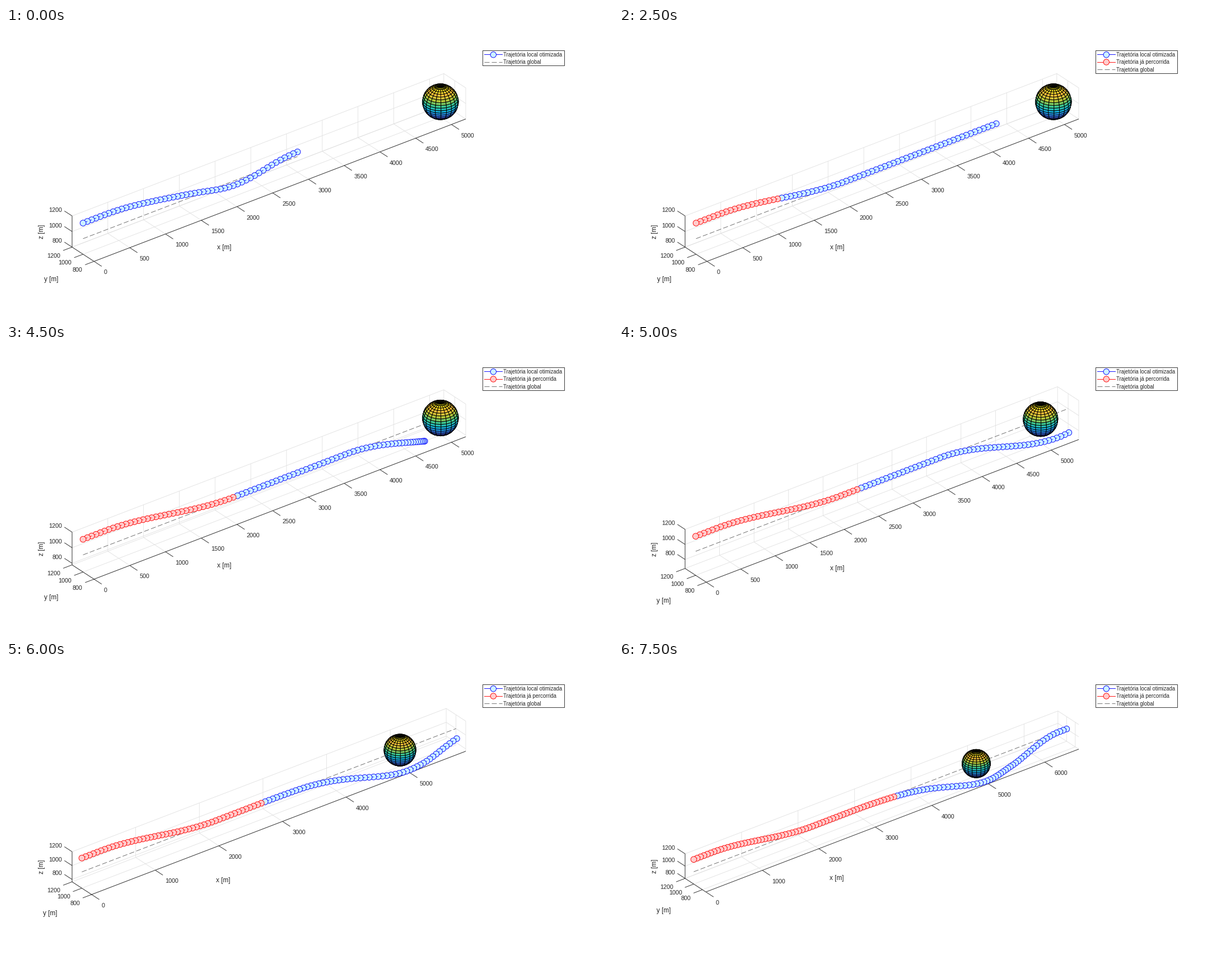
A matplotlib script for the animation above (8000 ms loop, 1084 px wide and 517 px high).

```python
import numpy as np
import matplotlib.pyplot as plt
from matplotlib.animation import FuncAnimation
from matplotlib.collections import LineCollection, PathCollection, PolyCollection
from matplotlib.colors import LinearSegmentedColormap
from matplotlib.path import Path
from matplotlib.patches import Rectangle

W, H, DPI = 1084, 517, 100
PT = 72 / DPI                     # points per pixel
plt.rcParams["font.family"] = "Liberation Sans"
plt.rcParams["lines.scale_dashes"] = False

INK = (0.15, 0.15, 0.15)
GRID = (0.875, 0.875, 0.875)
GLOBAL = (0.33, 0.33, 0.33)
BLUE, BLUE_FILL = "#0000ff", "#ccf2ff"
RED, RED_FILL = "#ff0000", "#ffcccc"

STEP, HORIZON, PER_FRAME = 60, 50, 4
BALL, RADIUS = 5000, 200          # sphere centre along x, and its radius
CA, SA = np.cos(np.radians(37.5)), np.sin(np.radians(37.5))
SE, CE = 0.5, np.sqrt(0.75)       # elevation of 30 degrees

parula = LinearSegmentedColormap.from_list("parula", [
    (.242, .150, .660), (.281, .323, .958), (.179, .529, .968), (.069, .695, .839),
    (.216, .784, .592), (.672, .779, .223), (.997, .766, .220), (.977, .984, .081)])


def ease(x, a, b):
    t = np.clip((x - a) / (b - a), 0, 1)
    return t * t * (3 - 2 * t)


def bump(x, center, width):
    return np.exp(-((x - center) / width) ** 2)


def plan(k):
    """Flown and planned points (x, y, z) at step k."""
    x = STEP * np.arange(PER_FRAME * k + HORIZON + 1.0)

    # Brake in front of the sphere when the plan would end inside it
    if BALL - RADIUS < x[-1] < BALL + RADIUS:
        late = np.clip((x - 4200) / (x[-1] - 4200), 0, None)
        x = x - (x[-1] - 4780) * late ** 2

    # Come down to the global line; the first plans swing below it
    swing = max(0, 1 - k / 2)
    y = np.full_like(x, 1000)
    z = 1200 - 200 * ease(x, 300, 2100)
    z += swing * (60 * ease(x, 2300, 3000) - 58 * bump(x, 2130, 400))

    # Near the sphere: first dive below it, later pass beside it
    if k >= 9:
        near = min(k - 9, 2)
        beside = np.clip((k - 11) / 2, 0, 1)
        after = np.clip((k - 13) / 2, 0, 1)
        dive = (340 - 20 * near) * ease(x, 3700 - 150 * near, 5500 - 200 * near)
        dive *= 1 - ease(x, 5250, 6900)
        dip = 195 * ease(x, 2800, 6000)
        dip *= 1 - (0.65 + 0.35 * after) * ease(x, 5250 + 300 * after, 5950 + 500 * after)
        z -= (1 - beside) * dive + beside * dip
        y -= (25 * near + 230 * beside) * bump(x, 4900, 640)
    return x, y, z


class View:
    """Equal-scale orthographic view fitted to the width of the stage."""

    def __init__(self, end, y, z):
        self.x1 = max(BALL + RADIUS, end)
        self.y0, self.z0 = min(800, y.min()), min(800, z.min())
        self.y1 = self.z1 = 1200
        dy, dz = self.y1 - self.y0, self.z1 - self.z0
        self.s = 703 / (CA * self.x1 + SA * dy)
        height = self.s * (SA * SE * self.x1 + CA * SE * dy + CE * dz)
        self.base = 249.5 + height / 2

    def __call__(self, x, y, z):
        px = 118 + self.s * (CA * x + SA * (self.y1 - y))
        py = self.base - self.s * (SA * SE * x + CA * SE * (y - self.y0)
                                   + CE * (z - self.z0))
        return np.stack(np.broadcast_arrays(px, py), -1)


def sphere_mesh(n=20):
    """Faces of the sphere from back to front, with their colours."""
    lon = np.linspace(-np.pi, np.pi, n + 1)
    lat = np.linspace(-np.pi / 2, np.pi / 2, n + 1)
    faces, depth, colors = [], [], []
    for j in range(n):
        for i in range(n):
            a = lon[[i, i + 1, i + 1, i]]
            b = lat[[j, j, j + 1, j + 1]]
            p = np.array([np.cos(b) * np.cos(a), np.cos(b) * np.sin(a), np.sin(b)])
            faces.append(RADIUS * p + np.array([[BALL], [1000], [1000]]))
            depth.append(np.dot([-SA * CE, -CA * CE, SE], p.mean(axis=1)))
            colors.append(parula((np.sin(lat[j]) + 1) / 2))
    order = np.argsort(depth)
    return [faces[i] for i in order], [colors[i] for i in order]


FACES, FACE_COLORS = sphere_mesh()

fig = plt.figure(figsize=(W / DPI, H / DPI), dpi=DPI, facecolor="white")
ax = fig.add_axes([0, 0, 1, 1])


def label(p, dx, dy, text, size=10.8, ha="center", va="center", **kw):
    ax.text(p[0] + dx, p[1] + dy, text, fontsize=size * PT, ha=ha, va=va,
            color=INK, zorder=9, **kw)


def segments(lines, color, width, z):
    ax.add_collection(LineCollection(lines, colors=[color], linewidths=width * PT, zorder=z))


def dashed(p, q, z):
    ax.plot([p[0], q[0]], [p[1], q[1]], color=GLOBAL, lw=0.8 * PT, zorder=z,
            ls=(0, (9 * PT, 4 * PT)), dash_capstyle="butt")


def beads(points, flown):
    """Linked markers; the nearer ones cover those behind them."""
    paths, faces, edges = [], [], []
    for i in range(len(points) - 1, -1, -1):
        edge, fill = (RED, RED_FILL) if i < flown else (BLUE, BLUE_FILL)
        paths.append(Path.circle(points[i], 5.3))
        faces.append(fill)
        edges.append(edge)
        if i and i != flown:
            paths.append(Path([points[i - 1], points[i]]))
            faces.append("none")
            edges.append(edge)
    ax.add_collection(PathCollection(paths, facecolors=faces, edgecolors=edges,
                                     linewidths=0.9 * PT, zorder=6))


def draw_axes(v):
    x1, y0, y1, z0, z1 = v.x1, v.y0, v.y1, v.z0, v.z1
    xs = range(0, x1 + 1, 500 if x1 <= 5500 else 1000)
    ys = zs = (800, 1000, 1200)

    grid = [[v(x, y0, z0), v(x, y1, z0), v(x, y1, z1)] for x in xs]
    grid += [[v(0, y, z0), v(x1, y, z0), v(x1, y, z1)] for y in ys]
    grid += [[v(0, y1, z), v(x1, y1, z), v(x1, y0, z)] for z in zs]
    segments(grid, GRID, 0.8, 1)

    back = np.array([-0.838, -0.546]) * 16.3
    side = np.array([-0.934, 0.358]) * 17
    lines = [[v(x1, y0, z0), v(0, y0, z0), v(0, y1, z0), v(0, y1, z1)]]
    for x in xs:
        p = v(x, y0, z0)
        lines.append([p, p - back])
        label(p, 17.3, 20, str(x), ha="left")
    for y in ys:
        p = v(0, y, z0)
        lines.append([p, p + side])
        label(p, -20.5, 15.7, str(y), ha="right")
    for z in zs:
        p = v(0, y1, z)
        lines.append([p, p + back])
        label(p, -18, -10.5, str(z), ha="right")
    segments(lines, INK, 0.9, 2)

    label(v(x1 / 2, y0, z0), -99, 103, "x [m]", 11.8)
    label(v(0, (y0 + y1) / 2, z0), -57, 45.5, "y [m]", 11.8)
    label(v(0, y1, (z0 + z1) / 2), -54, 0, "z [m]", 11.8, rotation=90)


def draw_legend(flown):
    rows = [("Trajetória local otimizada", BLUE, BLUE_FILL)]
    if flown:
        rows.append(("Trajetória já percorrida", RED, RED_FILL))
    rows.append(("Trajetória global", None, None))
    ax.add_patch(Rectangle((850.5, 39.5), 146, 1.5 + 13.2 * len(rows), fc="white",
                           ec=INK, lw=0.9 * PT, zorder=7))
    for i, (text, edge, fill) in enumerate(rows):
        y = 47.3 + 13.2 * i
        if edge:
            ax.plot([854, 886], [y, y], color=edge, lw=0.9 * PT, zorder=8)
            ax.add_collection(PathCollection([Path.circle((869.8, y), 5.2)], facecolors=fill,
                                             edgecolors=edge, linewidths=0.9 * PT, zorder=8))
        else:
            dashed((854, y), (886, y), 8)
        label((887.7, y), 0, 3.8, text, 9.55, ha="left", va="baseline")


def update(k):
    ax.cla()
    ax.set(xlim=(0, W), ylim=(H, 0))
    ax.axis("off")
    flown = PER_FRAME * k
    end = STEP * (flown + HORIZON)
    x, y, z = plan(k)
    v = View(end, y, z)
    draw_axes(v)

    # The global line runs through the sphere
    enter, leave = BALL - RADIUS, BALL + RADIUS
    if end > leave:
        dashed(v(leave, 1000, 1000), v(end, 1000, 1000), 3)
    ax.add_collection(PolyCollection([v(*f) for f in FACES], facecolors=FACE_COLORS,
                                     edgecolors="black", linewidths=0.95 * PT, zorder=4))
    dashed(v(0, 1000, 1000), v(min(end, enter), 1000, 1000), 5)

    beads(v(x, y, z), flown)
    draw_legend(flown)
    return []


anim = FuncAnimation(fig, update, frames=16, interval=500, init_func=lambda: [],
                     repeat=True, repeat_delay=0, blit=False)
plt.show()
```
